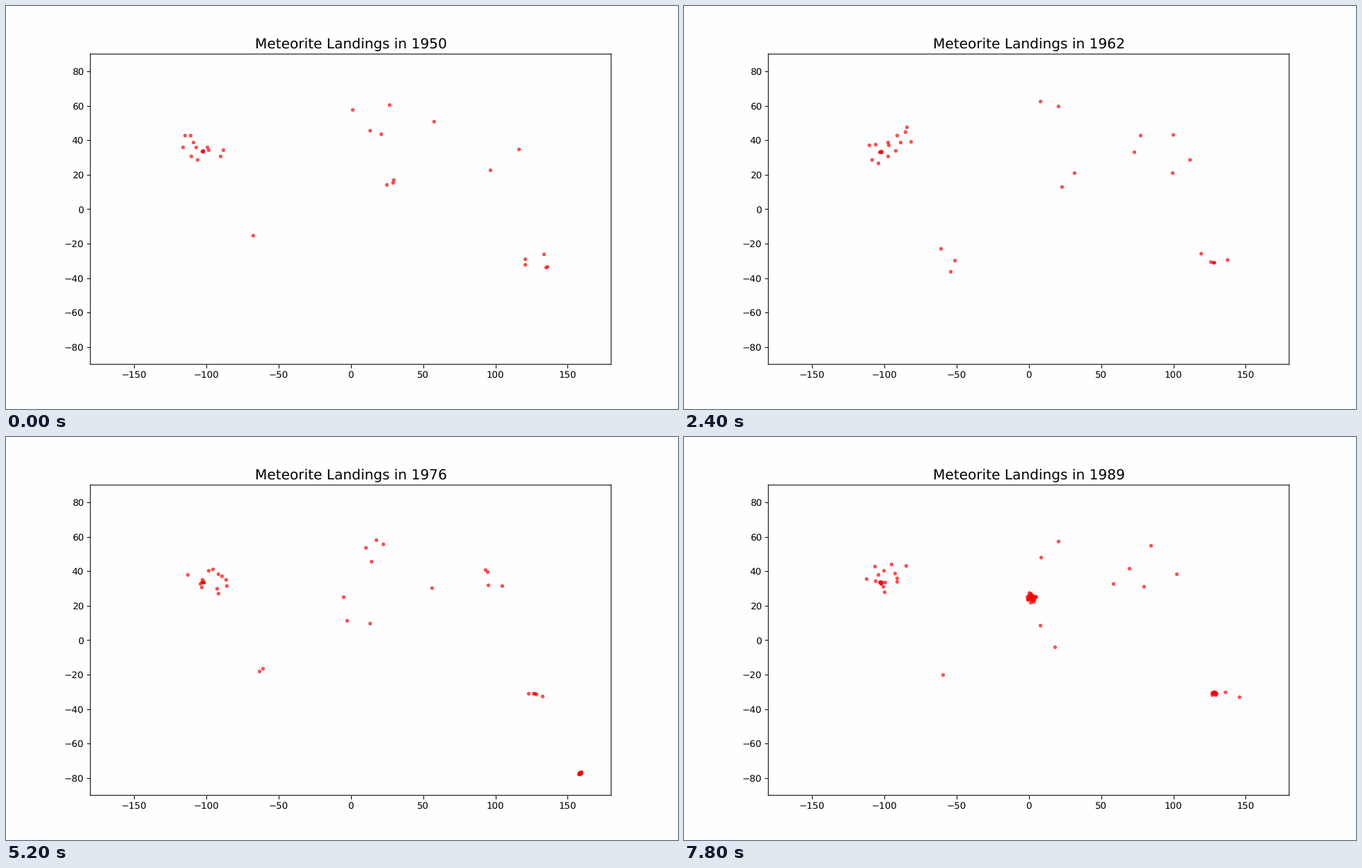
A matplotlib script that plays this animation: 966x580 px, repeating every 8000 ms.

```python
import matplotlib.pyplot as plt
import numpy as np
from matplotlib.animation import FuncAnimation

START, YEARS, STEP = 1950, 40, 200
K = 0.9666  # scale of text, ticks and lines
PAPER = "#fefefe"

plt.rcParams.update({
    "font.family": "DejaVu Sans",
    "font.size": 10 * K,
    "text.hinting": "none",
    "axes.linewidth": 0.8 * K,
    "axes.titlesize": 15 * K,
    "axes.titlepad": 6 * K,
    "axes.facecolor": PAPER,
    "figure.facecolor": PAPER,
})
for axis in ("xtick", "ytick"):
    plt.rcParams.update({
        f"{axis}.major.size": 3.5 * K,
        f"{axis}.major.width": 0.8 * K,
        f"{axis}.major.pad": 3.5 * K,
    })

# Sparse finds of every year: most finds, lon, lat, spread
REGIONS = [
    (16, -98, 37, 9, 6),      # North America
    (4, 13, 52, 9, 6),        # Europe
    (5, 88, 37, 20, 9),       # Asia
    (3, 18, 10, 14, 12),      # Africa
    (3, -57, -22, 8, 7),      # South America
    (5, 133, -30, 7, 3),      # Australia
]

# Dense search fields: first and last year, finds, lon, lat, spread
FIELDS = [
    (1950, 1989, 5, -102.6, 33.7, 0.6, 0.4),
    (1962, 1989, 3, 127.2, -30.8, 0.8, 0.4),
    (1976, 1988, 20, 158.5, -77.0, 0.5, 0.3),
    (1979, 1988, 20, 35.7, -71.8, 0.2, 0.1),
    (1982, 1989, 18, 128.2, -30.4, 0.8, 0.2),
    (1982, 1988, 15, -68.1, -85.8, 0.3, 0.1),
    (1982, 1988, 12, -92.5, -85.5, 1.0, 0.1),
    (1989, 1989, 30, 1.8, 24.8, 1.6, 1.4),
]


def spray(rng, n, lon, lat, dx, dy):
    """n points scattered around one place, within two deviations."""
    jitter = np.clip(rng.normal(size=(n, 2)), -2, 2)
    return jitter * (dx, dy) + (lon, lat)


def landings(year):
    rng = np.random.default_rng(year)
    parts = [spray(rng, rng.integers(n // 2, n + 1), *place)
             for n, *place in REGIONS]
    parts += [spray(rng, *field) for first, last, *field in FIELDS
              if first <= year <= last]
    return np.vstack(parts)


fig = plt.figure(figsize=(9.66, 5.8), dpi=100)
ax = fig.add_axes([0.1255, 0.1108, 0.775, 0.77])
ax.set_xlim(-180, 180)
ax.set_ylim(-90, 90)
for spine in ax.spines.values():
    spine.set_snap(False)
dots, = ax.plot([], [], "ro", markersize=3 * K, markeredgewidth=K, alpha=0.6)
title = ax.set_title("")


def update(i):
    year = START + i
    dots.set_data(*landings(year).T)
    title.set_text(f"Meteorite Landings in {year}")
    return dots, title


anim = FuncAnimation(fig, update, frames=YEARS, interval=STEP, repeat=True)
plt.show()
```
